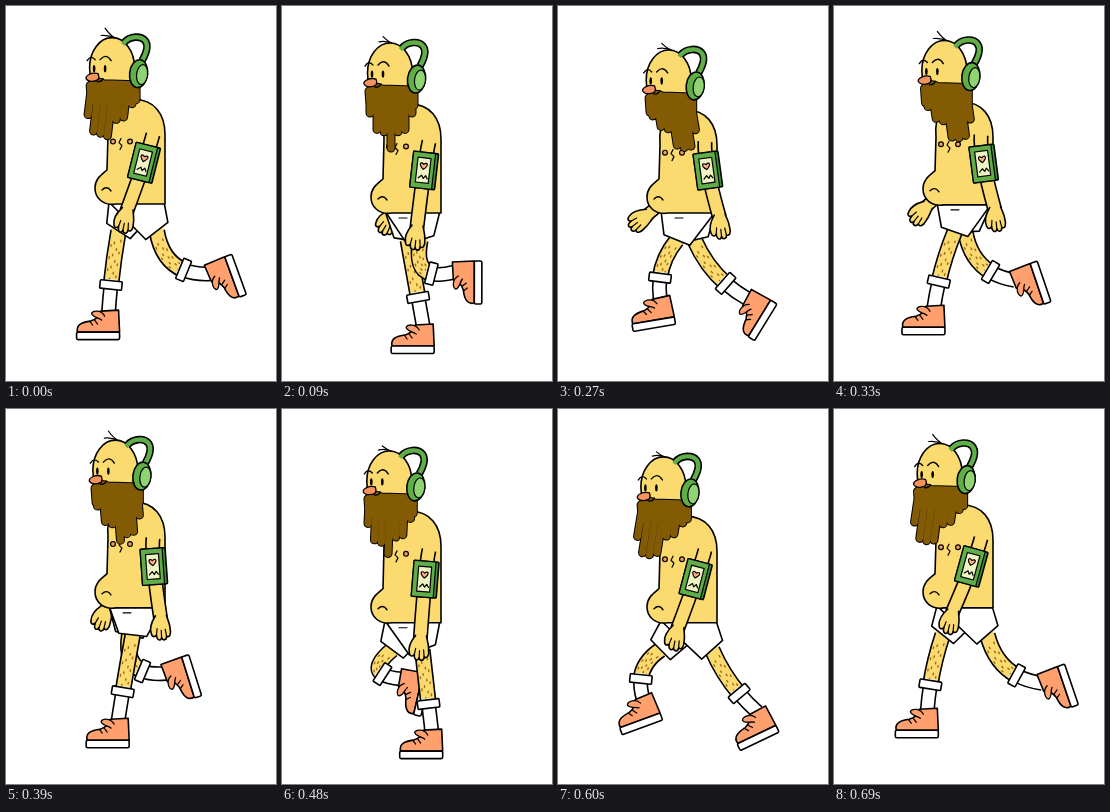
Recreate the animation shown at these times as an HTML page with a canvas. Size 270x375 px, loop 720 ms.

```html
<!DOCTYPE html>
<html lang="en">
<head>
<meta charset="utf-8">
<title>Walking man</title>
<style>
  html, body { margin: 0; width: 100%; height: 100%; overflow: hidden; background: #fff; }
  canvas { display: block; width: 270px; height: 375px; }
</style>
</head>
<body>
<canvas id="stage"></canvas>
<script>
const canvas = document.getElementById('stage');
const c = canvas.getContext('2d');
const dpr = Math.max(1, window.devicePixelRatio || 1);
canvas.width = 270 * dpr;
canvas.height = 375 * dpr;

const STEP = 30, STEPS = 24, LINE = 1.6;
const INK = '#000', SKIN = '#fbda70', BROWN = '#825b04', ORANGE = '#ffa06e',
      GREEN = '#5fae48', DARK = '#3f8f37', LIGHT = '#8fd372', PALE = '#eef3c4', WHITE = '#fff';

// Each leg swings around its own centre; `front` is the step where the foot is furthest ahead.
const FAR = { mid: 137, reach: 53, front: 20.7, phase: 0 };
const NEAR = { mid: 154, reach: 55, front: 10.3, phase: 12 };

const swing = (f, peak) => Math.cos(2 * Math.PI * (f - peak) / STEPS);
const lerp = ([ax, ay], [bx, by], t) => [ax + (bx - ax) * t, ay + (by - ay) * t];
const ease = (from, to, x) => {
  const u = Math.min(1, Math.max(0, (x - from) / (to - from)));
  return u * u * (3 - 2 * u);
};

function ink(path, fill, width = LINE) {
  if (fill) { c.fillStyle = fill; c.fill(path); }
  if (width) { c.lineWidth = width; c.strokeStyle = INK; c.stroke(path); }
}
const shape = (d, fill, width) => ink(new Path2D(d), fill, width);

function oval(x, y, rx, ry, fill, width, turn = 0) {
  const p = new Path2D();
  p.ellipse(x, y, rx, ry, turn, 0, 7);
  ink(p, fill, width);
}

function box(x, y, w, h, r, fill, width) {
  const p = new Path2D();
  p.roundRect(x, y, w, h, r);
  ink(p, fill, width);
}

// Outlined band with open ends.
function tube(d, width, fill) {
  const p = new Path2D(d);
  c.lineCap = 'butt';
  c.lineWidth = width + LINE; c.strokeStyle = INK; c.stroke(p);
  c.lineCap = 'square';
  c.lineWidth = width - LINE; c.strokeStyle = fill; c.stroke(p);
  c.lineCap = 'round';
}
const bend = (a, k, b) => `M${a}Q${k} ${b}`;

function placed(x, y, degrees, draw) {
  c.save();
  c.translate(x, y);
  c.rotate(degrees * Math.PI / 180);
  draw();
  c.restore();
}

function legPose({ mid, reach, front, phase }, f, hip, beat) {
  const p = (f + phase) % STEPS;
  const hem = [mid - 17 - reach * .33 * swing(f, front - 1), hip + 27];
  const ankle = [mid - reach * swing(f, front), 293 + 27 * swing(p, 3) - 6 * Math.cos(beat)];
  const dx = ankle[0] - hem[0], dy = ankle[1] - hem[1];
  const flex = 38 * ((1 + swing(p, 15)) / 2) ** 1.5 / Math.hypot(dx, dy);
  const [mx, my] = lerp(hem, ankle, .5);
  const knee = [mx - dy * flex, my + dx * flex];
  // The heel peels off the ground, then comes down again for the next step.
  const turn = -110 * ease(6.5, 11.3, p) * (1 - ease(12, 23, p));
  return { hem, knee, ankle, turn };
}

function shoe() {
  shape('M10-2L11 20H-31C-33 13-27 10-18 9C-12 7-9 4-8-1Z', ORANGE);
  box(-32, 20, 43, 7.5, 1.5, WHITE);
  shape('M-4 4C-7-2-15-2-17 1C-17 5-11 5-7 8', ORANGE, 1.3);
  shape('M-19 9l3 4M-14 8l3 4', null, 1.2);
}

function leg({ hem, knee, ankle, turn }) {
  const CUFF = .67;
  const upper = lerp(hem, knee, CUFF), lower = lerp(knee, ankle, CUFF);
  const cuff = lerp(upper, lower, CUFF);
  tube(bend(hem, upper, cuff), 15, SKIN);
  c.lineWidth = 1.4;
  c.strokeStyle = '#a36b14';
  for (let i = 0; i < 14; i++) {
    const t = .16 + i * .055, side = [-4, 2, 5, -1][i % 4];
    const a = lerp(hem, upper, t), b = lerp(upper, cuff, t), [x, y] = lerp(a, b, t);
    const angle = Math.atan2(b[1] - a[1], b[0] - a[0]);
    const ux = Math.cos(angle), uy = Math.sin(angle);
    c.beginPath();
    c.moveTo(x - uy * side, y + ux * side);
    c.lineTo(x - uy * side + ux * 1.6, y + ux * side + uy * 1.6);
    c.stroke();
  }
  tube(bend(cuff, lower, ankle), 13.5, WHITE);
  placed(...ankle, turn, shoe);
  const tilt = Math.atan2(lower[1] - upper[1], lower[0] - upper[0]) * 180 / Math.PI - 90;
  placed(...cuff, tilt, () => box(-11, -4.5, 22, 8.5, 1, WHITE));
}

function shortsLeg([hx, hy], hip) {
  const dx = hx - 130, dy = hy - hip, d = Math.hypot(dx, dy);
  const nx = dy / d * 14, ny = -dx / d * 14;
  shape(`M103 ${hip - 2}L${hx - nx} ${hy - ny}L${hx + nx} ${hy + ny}L158 ${hip - 2}Z`, WHITE);
}

function hand() {
  shape('M-5-3C-10 4-12 9-10 15C-9 19-6 18-5 16C-5 22-1 23 0 19C1 23 5 22 5 18C8 20 10 16 9 11C9 5 7 2 6-3', SKIN);
  shape('M-5 16L-4 10M0 19V12M5 18L4 11', null, 1.2);
}

function phone() {
  box(-12.5, -18, 25, 36, 1, DARK);
  shape('M-12.5-18H9.5V18H-12.5Z', GREEN, 1.2);
  box(-7.5, -12.5, 13, 25, 0, PALE, 1.2);
  shape('M-1-1C-7-6-4-9-1-6C2-9 5-6-1-1Z', '#ffb08a', 1.2);
  shape('M-5 8l3-3 2 3 2-3 2 3', null, 1.2);
}

function nearArm(f, hip) {
  const s = swing(f, 9.8);
  const px = 143.5 + 6.5 * s, py = hip * .85 - 11.5, tilt = 4 - 12 * s;
  const wx = 139.5 + 22.5 * s, wy = hip + 10 - 6 * (2 * s * s - 1);
  const sx = 147, sy = hip * .8 - 30;
  tube(`M${sx} ${sy}Q${2 * px - (sx + wx) / 2} ${2 * py - (sy + wy) / 2} ${wx} ${wy}`, 13.5, SKIN);
  placed(wx, wy, tilt * .8, hand);
  placed(px, py, tilt, phone);
}

function farArm(f, hip, drop) {
  const s = swing(f, 9), x = 110 - 21 * s, y = hip + 2;
  tube(`M122 ${140 + drop}Q118 ${175 + drop} ${x} ${y}`, 12, SKIN);
  placed(x, y, 15 + 40 * swing(f, 7.5), hand);
}

function torso(hip, top, chest) {
  shape(`M128 ${top}C148 ${top} 159 ${top + 14} 159 ${top + 35}V${hip}H110
    C97 ${hip + 2} 89 ${hip - 6} 89 ${hip - 16}C89 ${hip - 25} 95 ${hip - 29} 101 ${hip - 34}
    L102 ${top + 35}C100 ${top + 10} 110 ${top} 128 ${top}Z`, SKIN);
  shape(`M96 ${hip - 14}q5-5 9 1`, null, 1.4);
  oval(107, chest, 2.4, 2.4, '#f0a060', 1.2);
  oval(124, chest, 2.4, 2.4, '#f0a060', 1.2);
  shape(`M115 ${chest - 3}l-2 4 3 3-2 4`, null, 1.2);
}

function beard(shift, drop) {
  const left = 84 + 1.5 * shift, right = 134 + shift, y = 77 + drop;
  const peak = .5 + .065 * shift, lean = 2.6 * shift, drips = 7;
  const p = new Path2D(`M${left + 3} ${y + 2}Q${left + 9} ${y - 4} ${left + 16} ${y}
    L${right - 2} ${y + 1}V${y + 16}H${left + 4}Z`);
  for (let i = 0; i < drips; i++) {
    const u = i / (drips - 1), x = left + 4 + u * (right - left - 8);
    const length = Math.max(20, 55 - 56 * Math.abs(u - peak) + (i % 2 ? 4 : -3));
    p.moveTo(x, y + 6);
    p.lineTo(x + lean * length / 50, y + length);
  }
  for (const [color, width] of [[INK, 9], [BROWN, 7]]) {
    c.strokeStyle = color;
    c.lineWidth = width;
    c.stroke(p);
  }
  c.fillStyle = BROWN;
  c.fill(p);
}

function head(shift, drop, lift) {
  c.save();
  c.translate(shift, drop);
  shape(`M112 32q-6 ${-lift * .3}-11 ${-lift}M112 32q-8-4-15 ${-lift * .3}`, null, 1.2);
  oval(108, 61, 22.5, 30, SKIN);
  c.restore();
  beard(shift, drop);
  c.save();
  c.translate(shift, drop);
  shape('M83 54q4-6 8-1M96 53q6-7 11 1', null, 1.4);
  oval(90, 62, 1.3, 3.6, INK, 0);
  oval(101, 62, 1.3, 3.6, INK, 0);
  shape('M93 75q4 1 6-3', null, 1.3);
  shape('M94 67C88 65 81 69 82 72C84 76 91 75 94 73C95 71 95 69 94 67Z', '#f5935f', 1.3);
  tube('M120 36C126 29 137 29 141 34C145 39 142 47 138 54', 6, GREEN);
  oval(134.5, 67, 9, 14, GREEN, LINE, .12);
  oval(138, 68, 5.5, 10, LIGHT, 1.2, .12);
  c.restore();
}

function draw(f) {
  c.setTransform(dpr, 0, 0, dpr, 0, 0);
  c.fillStyle = WHITE;
  c.fillRect(0, 0, 270, 375);
  c.lineCap = c.lineJoin = 'round';

  // The body bobs twice per cycle, once for each step.
  const beat = Math.PI * f / 6;
  const hip = 208.5 - 12 * Math.cos(beat) + 1.5 * Math.cos(2 * beat);
  const drop = 9.5 - 9.5 * Math.cos(beat - .37);
  const far = legPose(FAR, f, hip, beat), near = legPose(NEAR, f, hip, beat);

  farArm(f, hip, drop);
  leg(far);
  shortsLeg(far.hem, hip);
  leg(near);
  shortsLeg(near.hem, hip);
  // Hide the seam where both trouser legs join.
  shape(`M106 ${hip}H156L${(far.hem[0] + near.hem[0]) / 2} ${hip + 17}Z`, WHITE, 0);
  shape(`M117 ${hip + 5}h8`, null, 1.2);

  torso(hip, 93 + drop * .85, 135 + drop * .9);
  nearArm(f, hip);
  head(2.7 * swing(f, 9), drop, 7.5 + 3 * Math.cos(beat));
}

let shown = -1;
const start = performance.now();
function tick() {
  const f = Math.floor((performance.now() - start) / STEP) % STEPS;
  if (f !== shown) draw(shown = f);
  requestAnimationFrame(tick);
}
tick();
</script>
</body>
</html>
```
